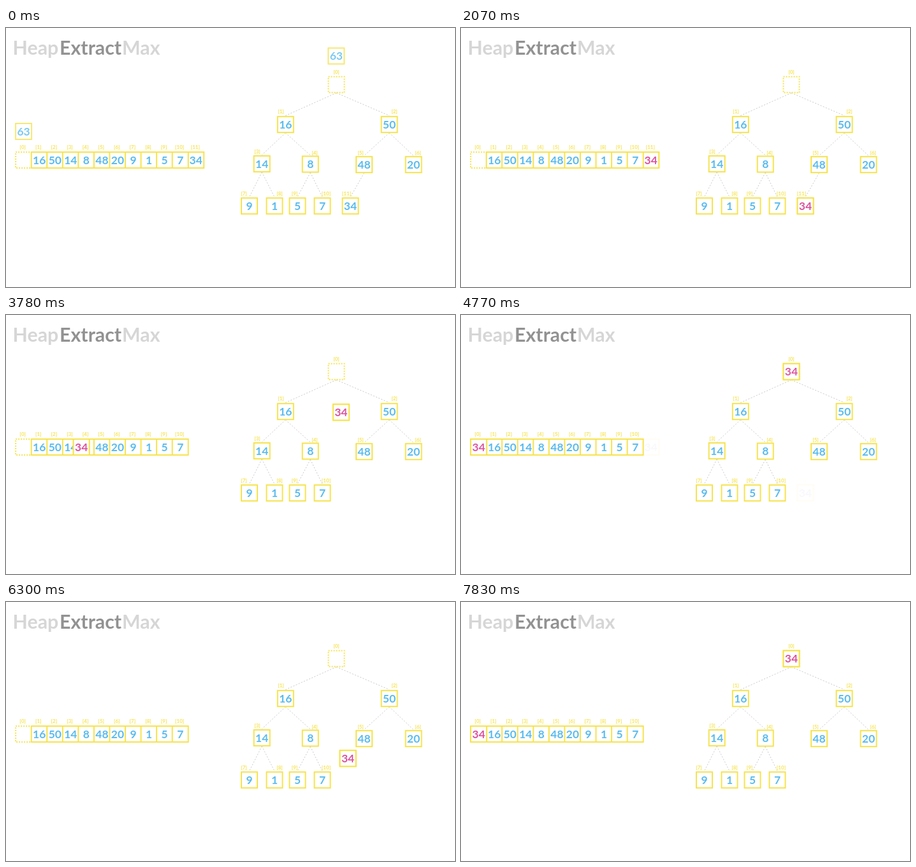
Animation, 704 px wide and 407 px high, one loop 8000 ms. Source, as an HTML page with a canvas:

```html
<!DOCTYPE html>
<html lang="en">
<head>
<meta charset="utf-8">
<title>Heap extract max</title>
<style>
  html, body { margin: 0; height: 100%; overflow: hidden; background: #fff; }
  canvas { display: block; }
</style>
</head>
<body>
<canvas width="704" height="407"></canvas>
<script>
const ctx = document.querySelector('canvas').getContext('2d');
const LOOP = 8000, LAST = 11;
const YELLOW = '#f6e34f', BLUE = '#5abbee', PINK = '#da549f', GREY = '#c9c9ce';
const values = ['', 16, 50, 14, 8, 48, 20, 9, 1, 5, 7, 34];

// Tree nodes: x, y, label x, label y
const nodes = [
  [518, 89, 518, 69], [438.3, 151.7, 431, 131], [601, 151.7, 609, 131],
  [401.2, 213.5, 394, 194], [477.2, 214, 484, 196], [561.5, 214.7, 556, 196],
  [639, 214.7, 646, 196], [381.5, 279.7, 373, 260], [421, 279.7, 429, 260],
  [457, 279.7, 452.5, 260], [496, 279.7, 502, 260], [540, 279.7, 534, 260]
];
const slots = values.map((_, i) => [27.7 + 24.55 * i, 207.5, 26.2 + 24.6 * i, 187]);

const ramp = (t, from, to) => Math.min(1, Math.max(0, (t - from) / (to - from)));
const ease = u => u < .5 ? .5 * (2 * u) ** 2.5 : 1 - .5 * (2 - 2 * u) ** 2.5;
const mix = (a, b, p) => a + (b - a) * p;

function text(str, x, y, size, color, align = 'center') {
  ctx.font = `700 ${size}px Lato, sans-serif`;
  ctx.textAlign = align;
  ctx.fillStyle = color;
  ctx.fillText(str, x, y);
}

function faded(alpha, draw) {
  if (alpha <= 0) return;
  ctx.globalAlpha = alpha;
  draw();
  ctx.globalAlpha = 1;
}

function box([x, y], value, color = BLUE, dash = []) {
  ctx.fillStyle = '#fff';
  ctx.fillRect(x - 12.5, y - 12.5, 25, 25);
  ctx.strokeStyle = YELLOW;
  ctx.lineWidth = 2;
  ctx.setLineDash(dash);
  ctx.strokeRect(x - 12.5, y - 12.5, 25, 25);
  text(value, x, y + 6.2, 17.5, color);
}

function label(i, place) {
  text(`[${i}]`, place[2], place[3] + 2.7, 8, YELLOW);
}

function edge(i) {
  const [x1, y1] = nodes[(i - 1) >> 1], [x2, y2] = nodes[i];
  ctx.strokeStyle = GREY;
  ctx.lineWidth = 1;
  ctx.setLineDash([2, 2.5]);
  ctx.beginPath();
  ctx.moveTo(x1, y1 + 13);
  ctx.lineTo(x2, y2 - 14);
  ctx.stroke();
}

function drawHeap(places, isTree, s) {
  if (isTree) {
    for (let i = 1; i < LAST; i++) edge(i);
    faded(s.lastAlpha, () => edge(LAST));
  }
  box(places[0], '', BLUE, [2, 2]);

  const moving = (p, alpha) => faded(alpha, () => {
    const at = [0, 1].map(k => mix(places[LAST][k], places[0][k], p));
    box(at, values[LAST]);
    faded(alpha * s.pink, () => box(at, values[LAST], PINK));
  });
  const drawMoving = () => {
    moving(s.move, 1 - s.reset);
    moving(0, s.reset);
  };

  // The moving cell passes beneath the others for the first half of its way
  const beneath = s.move < .5;
  if (beneath) drawMoving();
  for (let i = 1; i < LAST; i++) box(places[i], values[i]);
  if (!beneath) drawMoving();

  for (let i = 0; i < LAST; i++) label(i, places[i]);
  faded(s.lastAlpha, () => label(LAST, places[LAST]));
}

function stateAt(t) {
  const second = t >= 5400;
  const reset = ramp(t, 4750, 5400);
  const start = second ? 5805 : 2920;
  const fadeStart = second ? 5850 : 3030;
  const gone = ramp(t, fadeStart, fadeStart + 330);
  return {
    move: ease(ramp(t, start, start + 1500)),
    reset: second ? 0 : reset,
    lastAlpha: second ? 1 - gone : Math.max(1 - gone, reset),
    pink: ramp(t, 1680, 2070),
    removed: .8 * (1 - ramp(t, 550, 1050))
  };
}

function frame(now) {
  const s = stateAt(now % LOOP);
  ctx.fillStyle = '#fff';
  ctx.fillRect(0, 0, 704, 407);
  text('Heap', 10.5, 41.5, 30.4, '#d6d6d6', 'left');
  text('Extract', 84, 41.5, 30.4, '#929292', 'left');
  text('Max', 182, 41.5, 30.4, '#d6d6d6', 'left');
  drawHeap(slots, false, s);
  drawHeap(nodes, true, s);
  faded(s.removed, () => {
    box([27.6, 162.5], 63);
    box([517.8, 44], 63);
  });
  requestAnimationFrame(frame);
}
requestAnimationFrame(frame);
</script>
</body>
</html>
```
